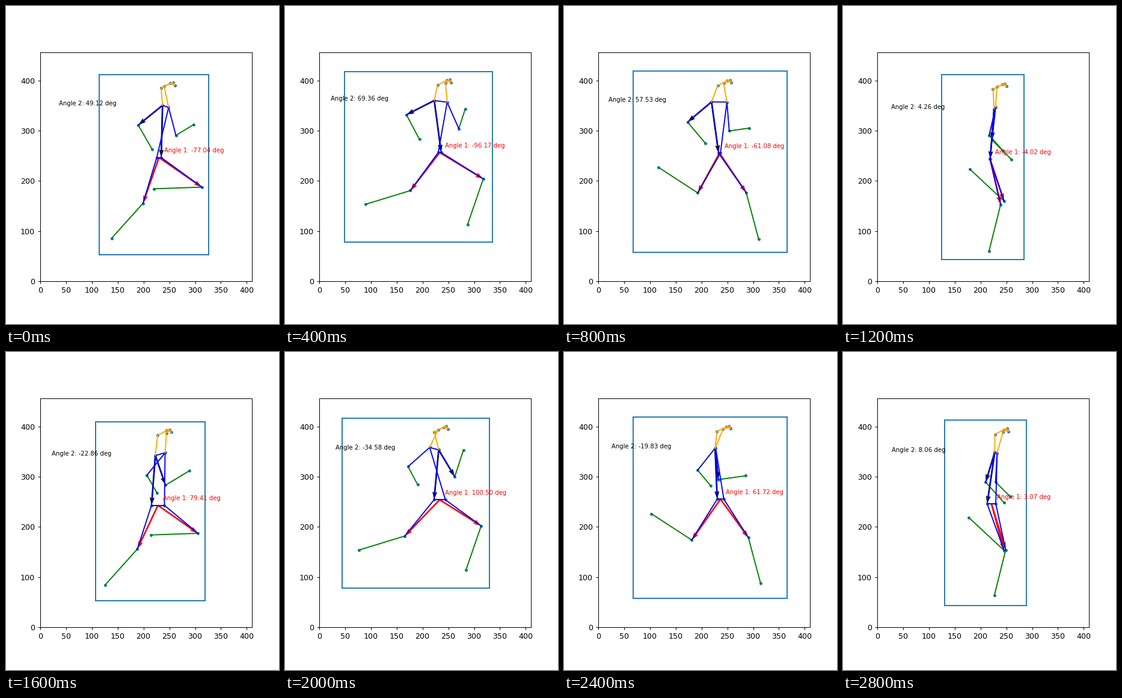
Animation, 454 px wide and 528 px high, one loop 3.2 s. Source, as a matplotlib script:

```python
import matplotlib.pyplot as plt
import numpy as np
from matplotlib.animation import ArtistAnimation

W, H, DPI = 454, 528, 91
LEFT, TOP, AX_W, AX_H = 56.75, 76.9, 351.85, 380
X_MAX, Y_MAX = 409.5, 456
STEPS = 8

plt.rcParams["font.family"] = "DejaVu Sans"
fig = plt.figure(figsize=((W + 0.01) / DPI, (H + 0.01) / DPI), dpi=DPI)
ax = fig.add_axes([LEFT / W, 1 - (TOP + AX_H) / H, AX_W / W, AX_H / H])
ax.set(xlim=(0, X_MAX), ylim=(0, Y_MAX),
       xticks=range(0, 401, 50), yticks=range(0, 401, 100))

# Degrees from straight down, forward positive, through one stride.
# The far side runs half a stride behind the near one.
UPPER_ARM = [-51, -63, -50, -4, 19, 31, 6, -17]
FOREARM = [30, 28, 40, 45, 121, 162, 98, 42]
THIGH = [54, 58, 35, 13, -18, -39, -32, 20]
SHIN = [-88, -19, 15, -14, -42, -73, -123, -133]

# Readouts shown beside the hip and the shoulder
HIP_ANGLE = [-77.04, -96.17, -61.08, -4.02, 79.41, 100.50, 61.72, 3.07]
ARM_ANGLE = [49.12, 69.36, 57.53, 4.26, -22.86, -34.58, -19.83, 8.06]

SIDES = ("near", "far")


def wave(k, n, amp, shift=0.0):
    """Cosine that repeats n times per stride."""
    return amp * np.cos(2 * np.pi * n * (k + shift) / STEPS)


def bone(angle, length):
    a = np.radians(angle)
    return length * np.array([np.sin(a), np.cos(a)])


def to_data(p):
    """Stage pixels to axes units."""
    return np.array([(p[0] - LEFT) * X_MAX / AX_W,
                     (TOP + AX_H - p[1]) * Y_MAX / AX_H])


def skeleton(k):
    """Joint positions in stage pixels at step k."""
    bob = wave(k, 2, 6.2, 0.5) - wave(k, 1, 1.5)
    chest = np.array([255.7 + wave(k, 1, 5.5, -0.8) + wave(k, 2, 3)
                      + wave(k, 4, 2.2), 163.8 + bob])
    pelvis = np.array([254 + wave(k, 2, 6.5, -1.3) + wave(k, 4, 2.5)
                       + wave(k, 1, 1.2, 1), 248.7 + bob])
    chest_turn = np.array([-4.1 + wave(k, 1, 6.7, 2.5) + wave(k, 3, 4.1)
                           - wave(k, 4, 2.5), 0.3 - wave(k, 1, 2, -0.3)])
    pelvis_turn = np.array([-3.5 + wave(k, 1, 6.2, -1)
                            + wave(k, 3, 3.7, -0.3), 0])
    nose = np.array([275.6 + wave(k, 1, 3, -0.3) + wave(k, 4, 2),
                     129.9 + 0.6 * bob])

    j = {"nose": nose,
         "near eye": nose + (-7.3, -3.2),
         "far eye": nose + (-2.6, -4.4),
         "near ear": nose + (-22.6, 4.8),
         "far ear": nose + (-12.8 - wave(k, 3, 5), 1.2)}
    # side sign, arm swing, leg swing, then bone lengths
    rig = {"near": (1, 1, 1, 52, 46, 80, 80),
           "far": (-1, 0.77, 0.93, 48, 34, 76, 78)}
    for i, side in enumerate(SIDES):
        sign, arm, leg, upper, fore, thigh, shin = rig[side]
        p = (k + i * STEPS // 2) % STEPS
        thigh *= 1 + wave(k, 1, 0.045)
        shoulder = chest + sign * chest_turn
        elbow = shoulder + bone(arm * UPPER_ARM[p], upper)
        hip = pelvis + sign * pelvis_turn
        knee = hip + bone(leg * THIGH[p], thigh)
        j.update({f"{side} shoulder": shoulder,
                  f"{side} elbow": elbow,
                  f"{side} wrist": elbow + bone(FOREARM[p], fore),
                  f"{side} hip": hip,
                  f"{side} knee": knee,
                  f"{side} ankle": knee + bone(SHIN[p], shin)})
    return j


def bounds(k):
    """Opposite corners of the box around the runner."""
    sway = wave(k, 1, 3)
    left = 132.7 + wave(k, 2, 39.2, 0.69) + wave(k, 4, 0.8) + sway
    right = 337.7 + wave(k, 2, 27, -1.48) + wave(k, 4, 14.9) + sway
    top = 111.4 + wave(k, 2, 4.2, 0.3) - wave(k, 1, 1)
    bottom = 408.6 + wave(k, 2, 14.6, 0.91) + wave(k, 4, 2.5)
    return to_data((left, top)), to_data((right, bottom))


def line(a, b, color):
    return ax.plot(*zip(a, b), color=color, lw=1.5)


def arrows(start, ends, color):
    d = np.array(ends) - start
    x, y = np.repeat([start], len(d), axis=0).T
    return ax.quiver(x, y, d[:, 0], d[:, 1], color=color, angles="xy",
                     scale_units="xy", scale=1, width=0.0075, zorder=1.6)


def label(n, angle, pos, color):
    return ax.text(*pos, f"Angle {n}: {angle:.2f} deg", color=color,
                   fontsize=8, zorder=4)


def chain(*parts):
    """Joint pairs along a limb, on both sides."""
    return [(f"{s} {a}", f"{s} {b}")
            for s in SIDES for a, b in zip(parts, parts[1:])]


BONES = {
    "green": chain("elbow", "wrist") + chain("knee", "ankle"),
    "blue": chain("elbow", "shoulder", "hip", "knee")
    + [("near shoulder", "far shoulder"), ("near hip", "far hip")],
    "orange": chain("eye", "ear", "shoulder")
    + [("nose", "near eye"), ("nose", "far eye"), ("near eye", "far eye")],
}


def draw(k):
    j = {name: to_data(p) for name, p in skeleton(k).items()}
    art = ax.plot(*zip(*j.values()), ".", color="C0", zorder=1.5)

    (x0, y0), (x1, y1) = bounds(k)
    corners = [(x0, y0), (x1, y0), (x1, y1), (x0, y1), (x0, y0)]
    for a, b in zip(corners, corners[1:]):
        art += line(a, b, "C0")
    for color, pairs in BONES.items():
        for a, b in pairs:
            art += line(j[a], j[b], color)

    mid = (j["near hip"] + j["far hip"]) / 2
    top = j["near shoulder"]
    return art + [
        arrows(mid, [j["near knee"], j["far knee"]], "red"),
        arrows(top, [j["near elbow"], j["near hip"]], "black"),
        label(1, HIP_ANGLE[k], mid + 10, "red"),
        label(2, ARM_ANGLE[k], top - (200, 0), "black"),
    ]


anim = ArtistAnimation(fig, [draw(k) for k in range(STEPS)], interval=400,
                       repeat=True, repeat_delay=0)
plt.show()
```
